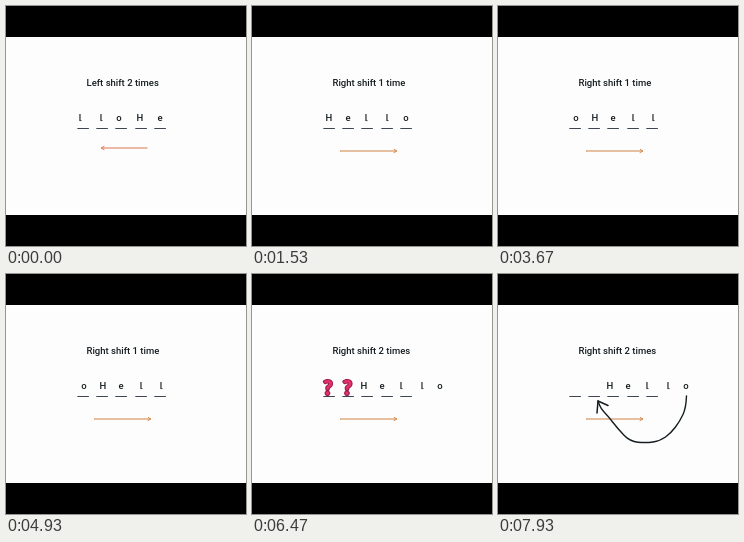
An HTML page with a canvas that plays this animation: 240 px wide and 240 px high, repeating every 8 s.

```html
<!DOCTYPE html>
<html lang="en">
<head>
<meta charset="utf-8">
<title>Shifting letters</title>
<style>
  html, body { margin: 0; width: 100%; height: 100%; overflow: hidden; background: #000; }
  canvas { display: block; width: 240px; height: 240px; }
</style>
</head>
<body>
<canvas id="stage"></canvas>
<script>
const LOOP = 8000;
const INK = '#161d20';
const canvas = document.getElementById('stage');
const ctx = canvas.getContext('2d');
const ratio = window.devicePixelRatio || 1;
canvas.width = canvas.height = 240 * ratio;

const SLOTS = [71, 90, 109, 129, 148];
const HOME = [77, 96, 114, 135, 154];
const ONE = 'Right shift 1 time';
const TWO = 'Right shift 2 times';

// Hand-drawn arrows: a stroke from the last letter to the freed slot, then its head.
const loopOne = {
  path: [[171.5, 125], [170.5, 139], [166, 151], [160, 162], [147, 169], [132, 173], [120, 176],
         [105, 168], [95, 158], [87, 145], [82, 135], [80, 126]],
  head: [[78, 138], [80, 126], [89, 131.5]]
};
const loopTwo = {
  path: [[188.5, 122], [188, 134], [182, 147], [173, 159], [162, 167], [148, 169],
         [132, 167.5], [120, 155], [110, 142], [103, 135], [100, 127]],
  head: [[99, 139], [100, 127], [110, 131.5]]
};

const scenes = [
  { at: 0, title: 'Left shift 2 times', word: 'lloHe', xs: [74, 95, 113, 134, 154], left: true },
  { at: 800, title: ONE, word: 'Hello', xs: HOME },
  { at: 1800, title: ONE, word: 'Hello', xs: [96, 114, 132, 154, 172], marks: [76] },
  { at: 2270, title: ONE, word: 'Hello', xs: [96, 114, 132, 154, 172], ink: loopOne, span: 460 },
  { at: 3270, title: ONE, word: 'oHell', xs: [78, 97, 115, 135, 155] },
  { at: 5200, title: TWO, word: 'Hello', xs: HOME },
  { at: 5870, title: TWO, word: 'Hello', xs: [112, 130, 149, 170, 188] },
  { at: 6200, title: TWO, word: 'Hello', xs: [112, 130, 149, 170, 188], marks: [76, 95.5] },
  { at: 7000, title: TWO, word: 'Hello', xs: [112, 130, 149, 170, 188], ink: loopTwo, span: 800 }
];

function line(points, color, width) {
  ctx.strokeStyle = color;
  ctx.lineWidth = width;
  ctx.beginPath();
  points.forEach(([x, y]) => ctx.lineTo(x, y));
  ctx.stroke();
}

// Rounds the corners by curving through the middle of each segment.
function curve(points, color, width) {
  ctx.strokeStyle = color;
  ctx.lineWidth = width;
  ctx.beginPath();
  ctx.moveTo(...points[0]);
  for (let i = 1; i < points.length - 1; i++) {
    const [x, y] = points[i];
    const [nx, ny] = points[i + 1];
    ctx.quadraticCurveTo(x, y, (x + nx) / 2, (y + ny) / 2);
  }
  ctx.lineTo(...points[points.length - 1]);
  ctx.stroke();
}

function partOf(points, share) {
  const gaps = points.slice(1).map((p, i) => Math.hypot(p[0] - points[i][0], p[1] - points[i][1]));
  let rest = share * gaps.reduce((a, b) => a + b, 0);
  const out = [points[0]];
  for (let i = 0; i < gaps.length && rest > 0; i++) {
    const k = Math.min(1, rest / gaps[i]);
    const [a, b] = [points[i], points[i + 1]];
    out.push([a[0] + (b[0] - a[0]) * k, a[1] + (b[1] - a[1]) * k]);
    rest -= gaps[i];
  }
  return out;
}

function letter(ch, x) {
  ctx.fillText(ch, x, 115);
  // small foot on the l
  if (ch === 'l') line([[x + 0.3, 114.6], [x + 1.2, 114.6]], INK, 0.7);
}

function mark(x) {
  ctx.font = '900 20px Lato, sans-serif';
  ctx.lineWidth = 2.2;
  ctx.strokeStyle = '#a01c50';
  ctx.strokeText('?', x, 120.5);
  ctx.fillStyle = '#e23268';
  ctx.fillText('?', x, 120.5);
}

function straightArrow(left) {
  const color = left ? '#d9764f' : '#cf8344';
  const [from, tip, y, d] = left ? [141, 95, 142, 1] : [88, 145, 145, -1];
  line([[from, y], [tip + d, y]], color, 1);
  line([[tip + d * 3, y - 1.6], [tip, y], [tip + d * 3, y + 1.6]], color, 0.9);
}

function draw(t) {
  const s = scenes.filter(scene => scene.at <= t).pop();
  ctx.setTransform(ratio, 0, 0, ratio, 0, 0);
  ctx.lineCap = ctx.lineJoin = 'round';
  ctx.fillStyle = '#000';
  ctx.fillRect(0, 0, 240, 240);
  ctx.fillStyle = '#fdfdfd';
  ctx.fillRect(0, 31, 240, 178);

  SLOTS.forEach(x => line([[x + 0.5, 122.5], [x + 11.5, 122.5]], '#3d4650', 1));
  straightArrow(s.left);

  ctx.fillStyle = INK;
  ctx.textAlign = 'left';
  ctx.font = '500 9.5px Roboto, sans-serif';
  ctx.fillText(s.title, 80.5, 79.5);
  ctx.textAlign = 'center';
  [...s.word].forEach((ch, i) => letter(ch, s.xs[i]));
  (s.marks || []).forEach(mark);

  if (s.ink) {
    const p = Math.min(1, (t - s.at) / s.span);
    curve(partOf(s.ink.path, Math.min(1, p / 0.8)), INK, 1.4);
    if (p > 0.8) line(partOf(s.ink.head, (p - 0.8) / 0.2), INK, 1.5);
  }
}

function tick() {
  draw(performance.now() % LOOP);
  requestAnimationFrame(tick);
}
tick();
</script>
</body>
</html>
```
